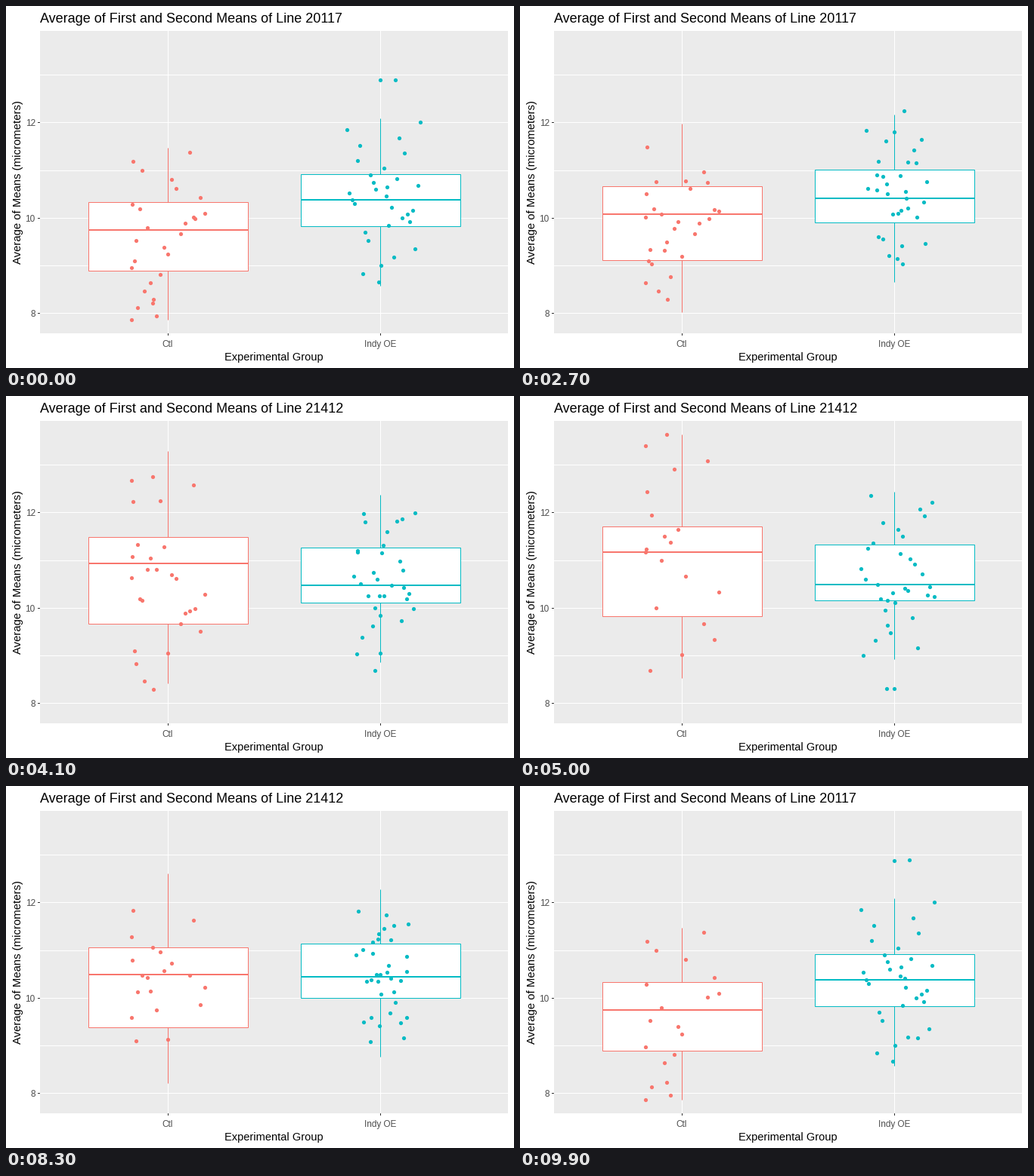
These frames come from a looping animation (672 px wide and 480 px high, 10 s). A matplotlib script:

```python
import numpy as np
import matplotlib.pyplot as plt
from matplotlib.animation import FuncAnimation
from matplotlib.patches import Rectangle

W, H, DPI = 672, 480, 96
PX = 72 / DPI                      # one pixel in points
FRAMES, INTERVAL = 100, 100
RED, TEAL = "#F8766D", "#04BBC4"
X_CTL, X_INDY = 214.5, 495.5
BOX_W, JITTER_W = 211, 101

plt.rcParams["font.family"] = "Liberation Sans"
plt.rcParams["path.snap"] = False
rng = np.random.default_rng(20)

# Pixel rows of top whisker, Q3, median, Q1, bottom whisker for each line
CTL_BOX = np.array([[188, 260, 297, 351, 416], [51, 173, 207, 292, 374]])
INDY_BOX = np.array([[149, 223, 257, 292, 371], [127, 197, 250, 271, 349]])

# Extreme points: x, y in the first line, x, y in the second
CTL_KEY = [(194, 394, 194, 51), (248, 280, 248, 86), (166, 416, 166, 207)]
INDY_KEY = [(495, 98, 495, 388), (515, 98, 486, 271), (504, 240, 485, 388)]


def mix(a, b, t):
    return a + (b - a) * t


def spread(n):
    """Evenly spaced fractions in random order."""
    return rng.permutation((np.arange(n) + 0.5) / n)


def jitter(left, n, skew=1.0):
    return left + JITTER_W * spread(n) ** skew


def heights(stats, n):
    """Values whose quartiles agree with the box."""
    return np.interp(spread(n), np.linspace(0, 1, 5), stats)


def line(xs, ys, color, width=1, z=2):
    return ax.plot(xs, ys, color=color, lw=width * PX, zorder=z,
                   solid_capstyle="butt")[0]


def text(x, y, s, size, color="black", ha="center", **kw):
    return ax.text(x, y, s, fontsize=size * PX, color=color, ha=ha,
                   va="baseline", **kw)


class Group:
    """A box plot with moving points; some points exist for one line only."""

    def __init__(self, x, color, stats, first, second, key):
        self.x, self.stats = x, stats
        n = min(len(first), len(second))
        key = np.array(key)
        self.start = np.vstack([first[:n], key[:, :2]])
        self.end = np.vstack([second[:n], key[:, 2:]])
        self.leaving, self.arriving = first[n:], second[n:]

        self.left = x - BOX_W / 2 + 0.5
        self.whiskers = line([], [], color, z=3)
        self.body = ax.add_patch(Rectangle(
            (self.left, 0), BOX_W, 1, fc="white", ec=color,
            lw=PX, joinstyle="miter", zorder=4))
        self.median = line([], [], color, 2, z=5)
        self.dots = ax.plot([], [], "o", ms=5.2 * PX, mfc=color, mew=0,
                            zorder=6)[0]

    def update(self, t, switched):
        rows = np.round(mix(*self.stats, t))
        top, q3, _, q1, low = rows + 0.5
        self.whiskers.set_data([self.x] * 5, [top, q3, np.nan, q1, low])
        self.body.set_y(q3)
        self.body.set_height(q1 - q3)
        self.median.set_data([self.left, self.left + BOX_W], [rows[2]] * 2)
        extra = self.arriving if switched else self.leaving
        points = np.vstack([mix(self.start, self.end, t), extra])
        self.dots.set_data(*points.T)


fig = plt.figure(figsize=(W / DPI, H / DPI), dpi=DPI, facecolor="white")
ax = fig.add_axes([0, 0, 1, 1])
ax.set(xlim=(0, W), ylim=(H, 0))
ax.axis("off")

# Panel, grid and axes
ax.add_patch(Rectangle((45, 33), 619, 401, fc="#EBEBEB", lw=0, zorder=0))
for i in range(6):
    y = np.floor(407.3 - 63.1 * i) + 0.5
    line([45, 664], [y, y], "white", z=1)
    if i in (0, 2, 4):
        line([42, 45], [y, y], "#333333")
        text(38.7, y + 4.5, str(8 + i), 11.73, "#4D4D4D", "right")
for x, label in ((X_CTL, "Ctl"), (X_INDY, "Indy OE")):
    line([x, x], [33, 434], "white", z=1)
    line([x, x], [434, 437], "#333333")
    text(x - 0.8, 452, label, 11.73, "#4D4D4D")
text(354.5, 470, "Experimental Group", 14.67)
text(20, 234, "Average of Means (micrometers)", 14.9,
     rotation=90, rotation_mode="anchor")
title = text(45, 22, "", 18, ha="left")

# Control points keep their x; the others move both ways
ctl_x = jitter(166, 24, skew=1.7)
ctl_first = np.column_stack([ctl_x, heights(CTL_BOX[0], 24)])
ctl_second = np.column_stack([ctl_x[:16], heights(CTL_BOX[1], 16)])
indy_first, indy_second = (
    np.column_stack([jitter(449, n), heights(stats, n)])
    for n, stats in zip((29, 31), INDY_BOX))

groups = [Group(X_CTL, RED, CTL_BOX, ctl_first, ctl_second, CTL_KEY),
          Group(X_INDY, TEAL, INDY_BOX, indy_first, indy_second, INDY_KEY)]


def update(n):
    p = np.interp(n, [16, 50, 67, 100], [0, 1, 1, 0])
    t = (1 - np.cos(np.pi * p)) / 2      # sine in-out
    number = 21412 if 33 <= n < 84 else 20117
    title.set_text(f"Average of First and Second Means of Line {number}")
    for group in groups:
        group.update(t, switched=n >= 50)
    return [title]


anim = FuncAnimation(fig, update, frames=FRAMES, interval=INTERVAL,
                     repeat=True, repeat_delay=0, blit=False)
plt.show()
```
